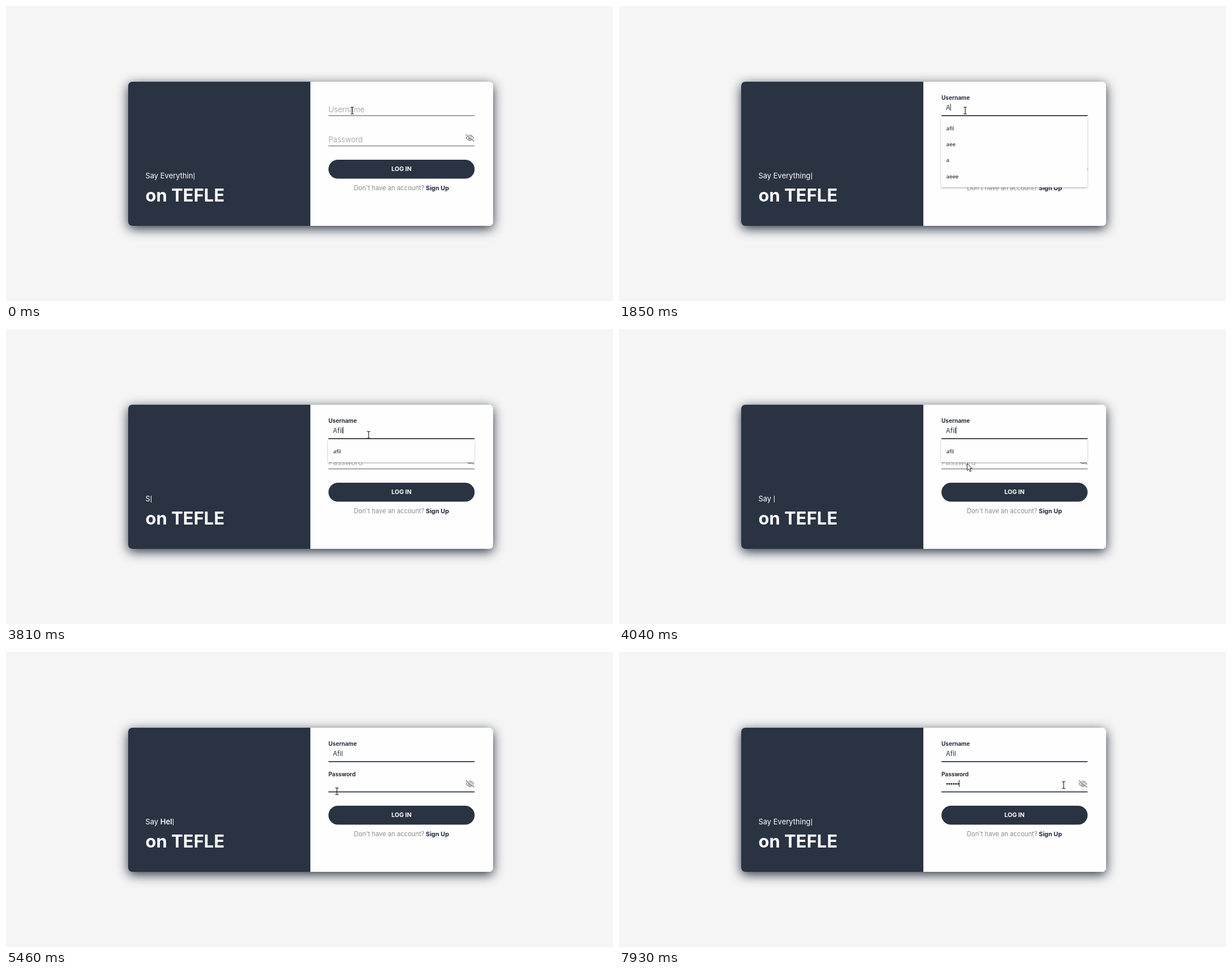
Animation, 1073 px wide and 522 px high, one loop 8 s. Source, as an HTML page:

```html
<!DOCTYPE html>
<html lang="en">
<head>
<meta charset="utf-8">
<title>Login form</title>
<style>
  html, body { margin: 0; width: 100%; height: 100%; overflow: hidden; background: #f5f5f5; }
  body { position: relative; font-family: Inter, "Open Sans", sans-serif; }
  .card {
    position: absolute; left: 215.5px; top: 133.5px; width: 645px; height: 255.5px;
    border-radius: 7px; box-shadow: 0 5px 20px #2a3342;
    background: linear-gradient(90deg, #2a3342 50%, #fefefe 50%);
  }
  .typed {
    position: absolute; left: 246.4px; top: 290.3px; color: #fff;
    font-size: 13px; line-height: 20px; white-space: pre;
  }
  .typed b { font-weight: 600; }
  .bar {
    display: inline-block; width: 1.3px; height: 12.5px; margin-left: 1px;
    background: #fff; vertical-align: -2px;
  }
  svg { position: absolute; left: 0; top: 0; }
  .option { font: 9.6px "Noto Sans", "Open Sans", sans-serif; fill: #111; }
  .value { font-size: 11.5px; fill: #2a3342; }
</style>
</head>
<body>
<div class="card"></div>
<div class="typed"><span id="plain"></span><b id="strong"></b><i class="bar" id="bar"></i></div>

<svg width="1073" height="522" viewBox="0 0 1073 522">
  <defs>
    <filter id="shade" x="-5%" y="-10%" width="110%" height="125%">
      <feDropShadow dx="0" dy="1" stdDeviation="1.3" flood-color="#000" flood-opacity=".38"/>
    </filter>
  </defs>

  <text x="246.5" y="345.5" font-size="31" font-weight="700" fill="#fff">on TEFLE</text>

  <rect id="userLine" x="570" y="193" width="258.3" height="2"/>
  <rect id="passLine" x="570" y="246.5" width="258.3" height="2"/>
  <text id="userLabel" x="570">Username</text>
  <text id="passLabel" x="570">Password</text>
  <text id="userValue" class="value" x="577.8" y="184"></text>
  <g id="dots" fill="#222"></g>

  <g fill="none" stroke="#999" stroke-width="1.7" stroke-linecap="round">
    <path d="M813.6 233.3Q820 223.8 826.6 233.3Q820 242.8 813.6 233.3Z"/>
    <circle cx="820.2" cy="233.3" r="2.3"/>
    <path d="M814 226.6L828 238" stroke="#fefefe" stroke-width="1.4"/>
    <path d="M813.2 227.6L827.2 239"/>
  </g>

  <rect x="570" y="272" width="258.4" height="33.6" rx="16.8" fill="#2a3342"/>
  <text x="699" y="292.2" font-size="10.7" font-weight="700" fill="#fff" text-anchor="middle">LOG IN</text>
  <text x="615" y="325.5" font-size="11.2" fill="#8c8c8c">Don't have an account?</text>
  <text x="742" y="325.5" font-size="10.9" font-weight="700" fill="#222840">Sign Up</text>

  <g id="menu">
    <rect id="menuBox" x="569" y="195.7" width="259" rx="2" fill="#fefefe" filter="url(#shade)"/>
    <rect id="hover" x="569" y="201.7" width="259" height="28.3" fill="#ececec"/>
    <g id="options"></g>
  </g>

  <rect id="caret" width="1" height="12.5" fill="#222"/>

  <circle id="click" r="10" fill="#fff23c" fill-opacity=".85" style="mix-blend-mode:multiply"/>
  <path id="beam" fill="none" stroke="#222" stroke-width="1.2"
        d="M-3 -6H-1L0 -5L1 -6H3M0 -5V5M-3 6H-1L0 5L1 6H3"/>
  <path id="arrow" fill="#fff" stroke="#222" stroke-width="1" stroke-linejoin="round"
        d="M0 0V12.2L2.8 9.6L5 14.4L7 13.5L4.9 8.8H8.7Z"/>
</svg>

<script>
const LOOP = 8000;
const $ = id => document.getElementById(id);
const clamp01 = v => Math.max(0, Math.min(1, v));
const mix = (a, b, k) => a + (b - a) * k;
const show = (el, on) => { el.style.display = on ? '' : 'none'; };
const setAttrs = (el, attrs) => {
  for (const key in attrs) el.setAttribute(key, attrs[key]);
};
const setText = (el, text) => {
  if (el.textContent !== text) el.textContent = text;
};

// CSS "ease" curve, solved for x by bisection.
function ease(x) {
  const bezier = (a, b, s) => 3 * a * s * (1 - s) ** 2 + 3 * b * s * s * (1 - s) + s ** 3;
  let lo = 0, hi = 1;
  for (let i = 0; i < 16; i++) {
    const mid = (lo + hi) / 2;
    if (bezier(.25, .25, mid) < x) lo = mid; else hi = mid;
  }
  return bezier(.1, 1, lo);
}

// Headline: each run types or deletes from one length to another.
const PREFIX = 'Say ';
const PHRASES = [
  { text: 'Everything you want', bold: false },
  { text: 'Hey', bold: true },
  { text: 'Help us', bold: true }
];
const RUNS = [
  { start: 0, step: 70, phrase: 0, from: 13, to: 23 },
  { start: 1283, step: 62, phrase: 0, from: 23, to: 0 },
  { start: 3720, step: 76, phrase: 1, from: 0, to: 7 },
  { start: 4880, step: 62, phrase: 1, from: 7, to: 4 },
  { start: 5225, step: 76, phrase: 2, from: 4, to: 7 },
  { start: 5460, step: 115, phrase: 2, from: 7, to: 11 },
  { start: 6640, step: 62, phrase: 2, from: 11, to: 4 },
  { start: 7150, step: 76, phrase: 0, from: 4, to: 23 }
];

function drawHeadline(t) {
  const run = RUNS.findLast(r => r.start <= t);
  const span = Math.abs(run.to - run.from);
  const done = Math.min(span, Math.floor((t - run.start) / run.step));
  const count = run.from + Math.sign(run.to - run.from) * done;
  const { text, bold } = PHRASES[run.phrase];
  const rest = text.slice(0, Math.max(0, count - PREFIX.length));
  setText($('plain'), PREFIX.slice(0, count) + (bold ? '' : rest));
  setText($('strong'), bold ? rest : '');

  // The bar blinks only while a finished phrase rests.
  const resting = done === span && run.to === PREFIX.length + text.length;
  const phase = (t - run.start - span * run.step) / 350 % 2;
  const opacity = phase < 1 ? 1 - ease(clamp01(phase)) : ease(phase - 1);
  $('bar').style.opacity = resting ? opacity : 1;
}

// Form
const USER_FOCUS = 915, PASS_FOCUS = 4660;
const NAME = 'Afil';
const NAME_KEYS = [1690, 2000, 2350, 2705];
const PASS_KEYS = [5900, 6060, 6220, 6390, 6540, 6700];
const ALL_OPTIONS = ['afil', 'Gormunnnnn', 'gormun', 'aee', 'a', 'aeee'];
const pressed = (keys, t) => keys.filter(k => k <= t).length;

function drawLabel(el, line, t, focus, baseline) {
  const k = ease(clamp01((t - focus - 75) / 400));
  const channel = (a, b) => Math.round(mix(a, b, k));
  setAttrs(el, {
    y: baseline - 21.2 * k,
    'font-size': mix(13.3, 10, k),
    'font-weight': Math.round(mix(350, 650, k)),
    fill: `rgb(${channel(148, 38)},${channel(148, 46)},${channel(148, 60)})`
  });
  line.setAttribute('fill', t >= focus ? '#434c5c' : '#a3a2a4');
}

function drawMenu(t, typed, pointer) {
  const open = t >= USER_FOCUS && t < PASS_FOCUS;
  show($('menu'), open);
  if (!open) return;
  const query = NAME.slice(0, typed).toLowerCase();
  const options = ALL_OPTIONS.filter(o => o.startsWith(query));
  $('menuBox').setAttribute('height', 12 + 28.35 * options.length);
  [...$('options').children].forEach((el, i) => {
    setText(el, options[i] || '');
  });
  show($('hover'), pointer.y > 202 && pointer.y < 230);
}

function drawForm(t, pointer) {
  drawLabel($('userLabel'), $('userLine'), t, USER_FOCUS, 187.6);
  drawLabel($('passLabel'), $('passLine'), t, PASS_FOCUS, 241.2);

  const typed = pressed(NAME_KEYS, t), dots = pressed(PASS_KEYS, t);
  setText($('userValue'), NAME.slice(0, typed));
  [...$('dots').children].forEach((el, i) => show(el, i < dots));
  drawMenu(t, typed, pointer);

  const inPass = t >= PASS_FOCUS;
  const resets = [USER_FOCUS, ...NAME_KEYS, PASS_FOCUS, ...PASS_KEYS].filter(k => k <= t);
  const lit = resets.length && Math.floor((t - resets.at(-1)) / 530) % 2 === 0;
  show($('caret'), lit);
  const nameWidth = typed ? $('userValue').getComputedTextLength() : 0;
  setAttrs($('caret'), {
    x: inPass ? 577.5 + 3.9 * dots : 577.6 + nameWidth,
    y: inPass ? 226.5 : 172.8
  });
}

// Pointer: time, x, y
const PATH = [
  [3690, 612, 185], [3730, 626, 171], [3810, 641, 187], [3920, 633, 214],
  [4040, 615.5, 238], [4300, 592, 243], [4450, 585, 246.5],
  [7380, 585, 246.5], [7480, 640, 240], [7700, 722, 229], [7900, 786, 235.5]
];

function pointerAt(t) {
  const i = PATH.findIndex(p => p[0] > t);
  if (i === 0) return { x: PATH[0][1], y: PATH[0][2] };
  const a = PATH[i < 0 ? PATH.length - 1 : i - 1], b = i < 0 ? a : PATH[i];
  const k = a === b ? 0 : (t - a[0]) / (b[0] - a[0]);
  return { x: mix(a[1], b[1], k), y: mix(a[2], b[2], k) };
}

function drawPointer(t, { x, y }) {
  const overMenu = t > USER_FOCUS && t < PASS_FOCUS && y > 196 && y < 241;
  show($('arrow'), overMenu);
  show($('beam'), !overMenu);
  const place = `translate(${x} ${y})`;
  $('arrow').setAttribute('transform', place);
  $('beam').setAttribute('transform', place);
  const clicking = [USER_FOCUS, PASS_FOCUS].some(c => t >= c && t < c + 160);
  show($('click'), clicking);
  setAttrs($('click'), { cx: x - 1, cy: y - 0.5 });
}

function addSvg(parent, tag, attrs) {
  const el = document.createElementNS('http://www.w3.org/2000/svg', tag);
  setAttrs(el, attrs);
  parent.append(el);
}

ALL_OPTIONS.forEach((_, i) =>
  addSvg($('options'), 'text', { class: 'option', x: 578.6, y: 219.6 + 28.35 * i }));
PASS_KEYS.forEach((_, i) =>
  addSvg($('dots'), 'circle', { cx: 580 + 3.9 * i, cy: 233.3, r: 1.5 }));

function draw() {
  const t = performance.now() % LOOP;
  const pointer = pointerAt(t);
  drawHeadline(t);
  drawForm(t, pointer);
  drawPointer(t, pointer);
  requestAnimationFrame(draw);
}
draw();
</script>
</body>
</html>
```
